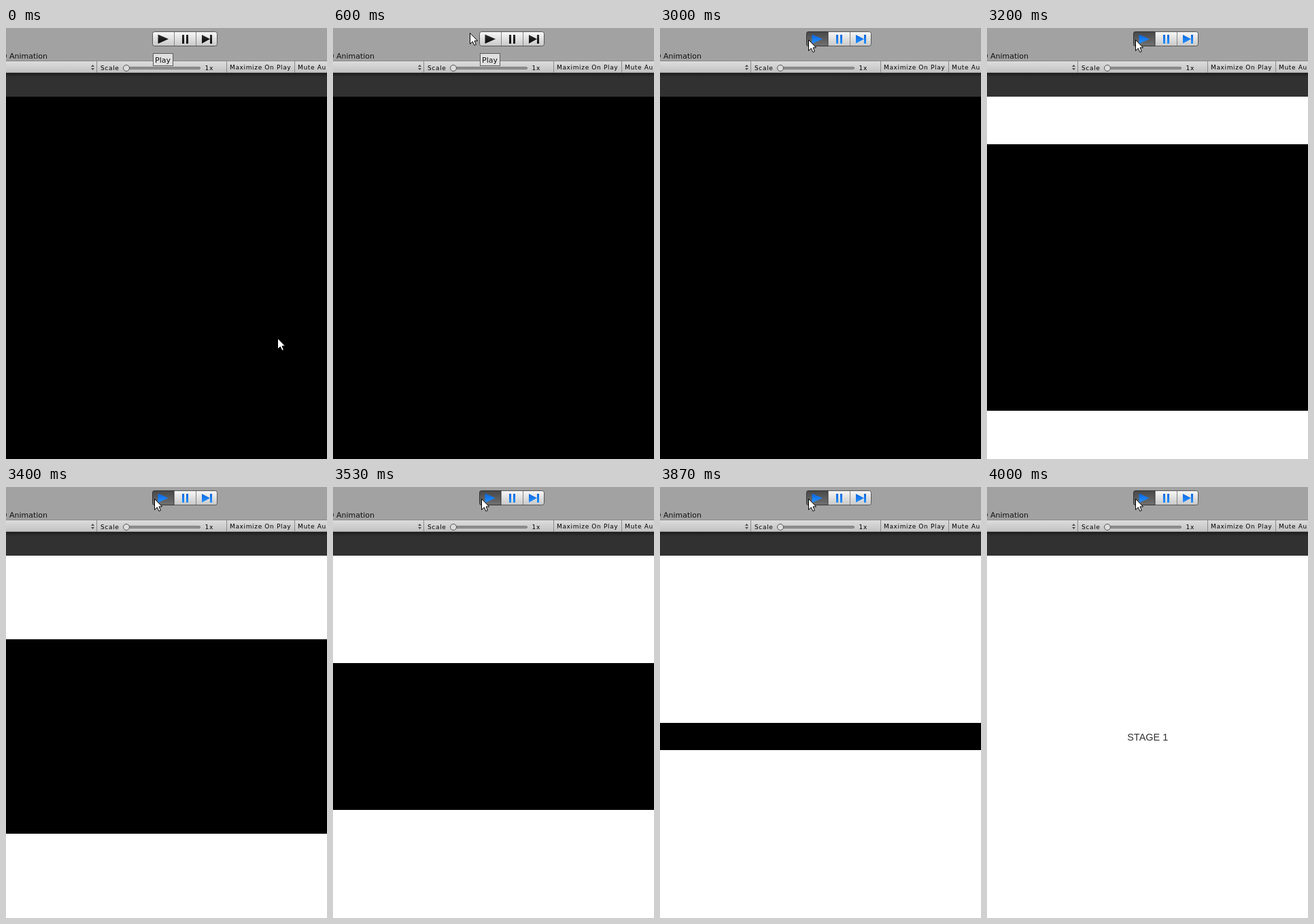
Write an HTML page that moves like this. It is 472x634 px and loops after 8000 ms.

```html
<!DOCTYPE html>
<html lang="en">
<head>
<meta charset="utf-8">
<title>Stage curtain</title>
<style>
  html, body { margin: 0; width: 100%; height: 100%; overflow: hidden; background: #fff; }
  #stage { position: absolute; left: 0; top: 0; width: 472px; height: 634px; overflow: hidden; background: #fff; }
  svg { position: absolute; left: 0; top: 0; display: block; }
  text { font-family: "DejaVu Sans", Verdana, sans-serif; font-size: 11px; fill: #111; }
  .small text { font-size: 9px; letter-spacing: .65px; fill: #000; }
  .title { font: 14.5px "Liberation Sans", Arial, sans-serif; fill: #323232; }

  #curtain { position: absolute; left: 0; width: 472px; background: #000; animation: shrink 8s infinite step-end; }
  #cursor { animation: move 8s infinite step-end; }
  #tip { animation: tip 8s infinite step-end; }
  #pressed { opacity: 0; animation: press 8s infinite step-end; }
  #live { opacity: 0; animation: live 8s infinite step-end; }
  #idle { animation: idle 8s infinite step-end; }

  @keyframes shrink {
    0% { top: 101px; height: 533px; }
    38.29% { top: 135.76px; height: 462.48px; animation-timing-function: steps(13, end); }
    49.12% { top: 364.82px; height: 4.36px; }
    49.99%, 100% { top: 367px; height: 0; }
  }
  @keyframes move {
    0% { transform: translate(399px, 456px); }
    .87% { transform: translate(203px, 139px); }
    1.62% { transform: translate(7px, -178px); }
    7.49% { transform: translate(201px, 7px); }
    8.37% { transform: translate(207px, 12px); }
    9.12% { transform: translate(211px, 15px); }
    11.62% { transform: translate(215px, 16px); }
    12.49%, 100% { transform: translate(218px, 17px); }
  }
  @keyframes tip { 0% { opacity: 1; } 13.37%, 100% { opacity: 0; } }
  @keyframes press { 0% { opacity: 0; } 13.37%, 100% { opacity: 1; } }
  @keyframes live { 0% { opacity: 0; } 37.49%, 100% { opacity: 1; } }
  @keyframes idle { 0% { opacity: 1; } 37.49%, 100% { opacity: 0; } }
</style>
</head>
<body>
<div id="stage">
  <svg width="472" height="634">
    <text class="title" x="236.3" y="372.5" text-anchor="middle">STAGE 1</text>
  </svg>
  <div id="curtain"></div>
  <svg width="472" height="634">
    <defs>
      <linearGradient id="bar" x2="0" y2="1">
        <stop stop-color="#dedede"/><stop offset="1" stop-color="#c2c2c2"/>
      </linearGradient>
      <linearGradient id="button" x2="0" y2="1">
        <stop stop-color="#f8f8f8"/><stop offset="1" stop-color="#c8c8c8"/>
      </linearGradient>
      <linearGradient id="down" x2="0" y2="1">
        <stop stop-color="#474747"/><stop offset="1" stop-color="#717171"/>
      </linearGradient>
      <linearGradient id="shade" x2="0" y2="1">
        <stop stop-color="#1b1b1b"/><stop offset="1" stop-color="#313131"/>
      </linearGradient>
      <linearGradient id="dark" gradientUnits="userSpaceOnUse" x1="0" x2="0" y1="9" y2="23">
        <stop stop-color="#303030"/><stop offset="1" stop-color="#080808"/>
      </linearGradient>
      <linearGradient id="blue" gradientUnits="userSpaceOnUse" x1="0" x2="0" y1="9" y2="23">
        <stop stop-color="#0a62dc"/><stop offset="1" stop-color="#2493ff"/>
      </linearGradient>
      <path id="icons" d="M223.5 9.5L239 16.3L223.5 23ZM259 10h3v13h-3ZM265 10h3v13h-3ZM288 10L300 16.3L288 22.8ZM300 10h3v13h-3Z"/>
    </defs>

    <rect width="472" height="48" fill="#a2a2a2"/>
    <text x="-14" y="45">2D Animation</text>

    <rect y="48" width="472" height="18" fill="url(#bar)"/>
    <path d="M0 48.5H472" stroke="#888"/>
    <path d="M0 65.5H472" stroke="#a0a0a0"/>
    <path d="M133.5 49V66M324.5 49V66M424.5 49V66" stroke="#8a8a8a"/>
    <path d="M125 57L127.5 54L130 57ZM125 59L127.5 62L130 59Z" fill="#4c4c4c"/>
    <g class="small">
      <text x="139" y="62">Scale</text>
      <text x="292.5" y="62">1x</text>
      <text x="329" y="61">Maximize On Play</text>
      <text x="429" y="61">Mute Au</text>
    </g>
    <rect x="175.5" y="57.5" width="110" height="3" rx="1.5" fill="#949494" stroke="#777"/>
    <circle cx="177" cy="59" r="4.5" fill="#dcdcdc" stroke="#555"/>

    <rect y="66" width="472" height="35" fill="#313131"/>
    <rect y="66" width="472" height="6" fill="url(#shade)"/>

    <rect x="215.5" y="5.5" width="95" height="21" rx="3" fill="url(#button)" stroke="#555"/>
    <path id="pressed" d="M247 5.5H218.5a3 3 0 0 0-3 3V23.5a3 3 0 0 0 3 3H247Z" fill="url(#down)" stroke="#333"/>
    <path d="M247.5 6V26M279.5 6V26" stroke="#858585"/>
    <g id="idle"><use href="#icons" fill="url(#dark)"/></g>
    <g id="live"><use href="#icons" fill="url(#blue)"/></g>

    <g id="tip">
      <rect x="216.5" y="37.5" width="29" height="18" fill="#e0e0e0" stroke="#5a5a5a"/>
      <text x="219" y="51">Play</text>
    </g>

    <path id="cursor" d="M.5 .5V16.5L4.3 12.9L6.9 18.5L9.4 17.4L7 11.9H11.6Z" fill="#fff" stroke="#000"/>
  </svg>
</div>
</body>
</html>
```
